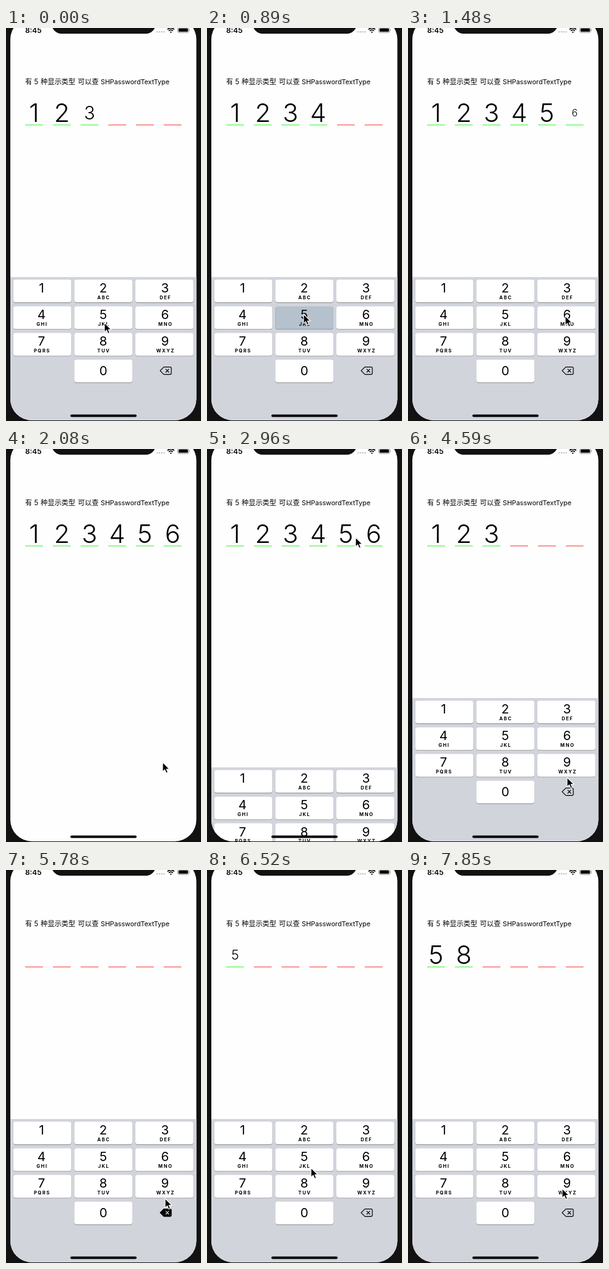
Recreate the animation shown at these times as an HTML page. Size 315 by 636 pixels, loop 8000 ms.

```html
<!DOCTYPE html>
<html lang="zh">
<head>
<meta charset="utf-8">
<style>
html, body { margin: 0; height: 100%; overflow: hidden; background: #121212; }
svg { display: block; width: 100vw; height: 100vh; font-family: Inter, Roboto, "Noto Sans CJK SC", "Noto Sans CJK", sans-serif; }
.mid { text-anchor: middle; }
.num { font-size: 20.5px; }
.abc { font-size: 7.6px; font-weight: 700; letter-spacing: 1.5px; }
.label { font-size: 11.2px; }
.digit { font-size: 41.5px; font-weight: 300; }
</style>
</head>
<body>
<svg viewBox="0 0 315 636">
  <defs>
    <clipPath id="screen"><rect x="7" y="-16.5" width="300.5" height="651.5" rx="35"/></clipPath>
  </defs>
  <rect width="315" height="636" fill="#121212"/>
  <g clip-path="url(#screen)">
    <rect width="315" height="636" fill="#fefefe"/>
    <g class="label">
      <text x="31" y="91">有</text>
      <text x="45.5" y="91">5</text>
      <text x="56" y="91">种显示类型</text>
      <text x="116" y="91">可以查</text>
      <text x="153" y="91" font-size="10.8" letter-spacing="-.04">SHPasswordTextType</text>
    </g>
    <g id="slots"></g>
    <g id="keyboard">
      <rect x="7" y="403" width="301" height="260" fill="#d1d4db"/>
      <g id="keys"></g>
      <g stroke-width="1.2" stroke-linecap="round" stroke-linejoin="round">
        <path id="del" d="M255 548.6H265Q267 548.6 267 550.6V558.6Q267 560.6 265 560.6H255L249 554.6Z" stroke="#000"/>
        <path id="cross" d="M258.2 552.2l4.8 4.8m0-4.8l-4.8 4.8"/>
      </g>
    </g>
    <rect x="104" y="625.6" width="107" height="4" rx="2"/>
  </g>
  <rect x="73.800" y="-40" width="168" height="49.300" rx="16" fill="#121212"/>
  <text x="31" y="7.700" font-size="11.8" font-weight="600">8:45</text>
  <path d="M244.200 6.300h12" stroke="#c4c4c6" stroke-width="2.600" stroke-linecap="round" stroke-dasharray="0 3.700"/>
  <g fill="none" stroke="#000" stroke-width="1.7">
    <path d="M260.800 2.300Q266.300-2.300 271.800 2.300M262.900 4.600Q266.300 1.800 269.700 4.600"/>
    <path d="M266.300 8L264.700 6.400Q266.300 5.200 267.900 6.400Z" fill="#000" stroke="none"/>
  </g>
  <rect x="277.500" y="-.8" width="17.600" height="8.200" rx="2.300" fill="none" stroke="#777" stroke-width=".9"/>
  <rect x="278.800" y=".5" width="15" height="5.600" rx="1.200"/>
  <path d="M296.200 1.800Q298 3.300 296.200 4.800Z" fill="#777"/>
  <path id="cursor" d="M0 0V15.300L3.500 12L5.900 17.400L8.500 16.300L6.200 11H11Z" stroke="#fff" stroke-width="1.100" stroke-linejoin="round"/>
</svg>
<script>
const LOOP = 8000, BEAT = 148.15;
const $ = id => document.getElementById(id);

function add(parent, tag, attrs, text = '') {
  const el = document.createElementNS('http://www.w3.org/2000/svg', tag);
  for (const k in attrs) el.setAttribute(k, attrs[k]);
  el.textContent = text;
  parent.append(el);
  return el;
}

// Number pad; the captions sit on a slightly wider grid than the keys
const keys = {};
['', 'ABC', 'DEF', 'GHI', 'JKL', 'MNO', 'PQRS', 'TUV', 'WXYZ', null].forEach((abc, i) => {
  const zero = abc === null;
  const col = zero ? 1 : i % 3;
  const name = zero ? 0 : i + 1;
  const x = 57.4 + col * 99.7;
  const y = 407.2 + Math.floor(i / 3) * 43.2;
  const box = { x: 11.7 + col * 98.6, width: 93.8, height: 36.8, rx: 4 };
  add($('keys'), 'rect', { ...box, y: y + .9, fill: '#898b90' });
  keys[name] = add($('keys'), 'rect', { ...box, y });
  add($('keys'), 'text', { class: 'mid num', x, y: y + (zero ? 25.4 : 20.8) }, name);
  if (abc) add($('keys'), 'text', { class: 'mid abc', x: x + .9, y: y + 31.6 }, abc);
});

// Six password slots
const slots = Array.from({ length: 6 }, (_, i) => {
  const x = 31 + i * 44.75;
  return {
    x: x + 14.4,
    line: add($('slots'), 'rect', { x, y: 156, width: 28.8, height: 1.7 }),
    text: add($('slots'), 'text', { class: 'mid digit', y: 14.9 })
  };
});

// [key, beat pressed, beats held]
const presses = [
  [4, 3, 1], [5, 5, 2], [6, 9, 1],
  ['del', 26, 1], ['del', 28, 1], ['del', 30, 1],
  ['del', 33, 2], ['del', 36, 1], ['del', 39, 2],
  [5, 42.6, 1], [8, 46.6, 1]
];

// Cursor stops: [beat of arrival, x, y]
const stops = [
  [0, 159, 477], [3, 62, 466], [5.5, 156, 463], [8.2, 254, 466],
  [14, 253, 507], [18, 240, 143], [23, 262, 515], [25, 257, 531.5],
  [43, 168, 482], [46.5, 165, 512], [51, 175, 568], [53, 249, 515.5]
];

const clamp = v => Math.max(0, Math.min(1, v));
const ramp = (b, from, to) => {
  const v = clamp((b - from) / (to - from));
  return v * v * (3 - 2 * v);
};

// Digits type on release, deletion acts on press
function typedAt(b) {
  const list = [[1, -9], [2, -9], [3, -1]];
  for (const [key, down, held] of presses) {
    if (key === 'del') { if (b >= down) list.pop(); }
    else if (b >= down + held) list.push([key, down + held]);
  }
  return list;
}

function cursorAt(b) {
  let [, x, y] = stops[0];
  for (const [at, nx, ny] of stops) {
    const k = ramp(b, at - 2, at);
    x += (nx - x) * k;
    y += (ny - y) * k;
  }
  return `translate(${x} ${y})`;
}

function draw(t) {
  const b = t / BEAT + .1;
  const typed = typedAt(b);
  slots.forEach(({ x, line, text }, i) => {
    const [digit, since] = typed[i] || ['', b];
    const scale = .35 + .65 * clamp((b - since) / 2);
    line.setAttribute('fill', typed[i] ? '#80fa7c' : '#fa8585');
    text.textContent = digit;
    text.setAttribute('transform', `translate(${x} 137.5) scale(${scale})`);
  });

  const down = presses.find(([, from, held]) => b >= from && b < from + held)?.[0];
  for (const k in keys) keys[k].setAttribute('fill', k === String(down) ? '#b5c1cd' : '#fff');
  $('del').setAttribute('fill', down === 'del' ? '#000' : 'none');
  $('cross').setAttribute('stroke', down === 'del' ? '#d1d4db' : '#000');

  const hidden = ramp(b, 10.5, 13.6) - ramp(b, 18.7, 21.4);
  $('keyboard').setAttribute('transform', `translate(0 ${hidden * 234})`);
  $('cursor').setAttribute('transform', cursorAt(b));
}

const start = performance.now();
function tick() {
  draw((performance.now() - start) % LOOP);
  requestAnimationFrame(tick);
}
tick();
</script>
</body>
</html>
```
